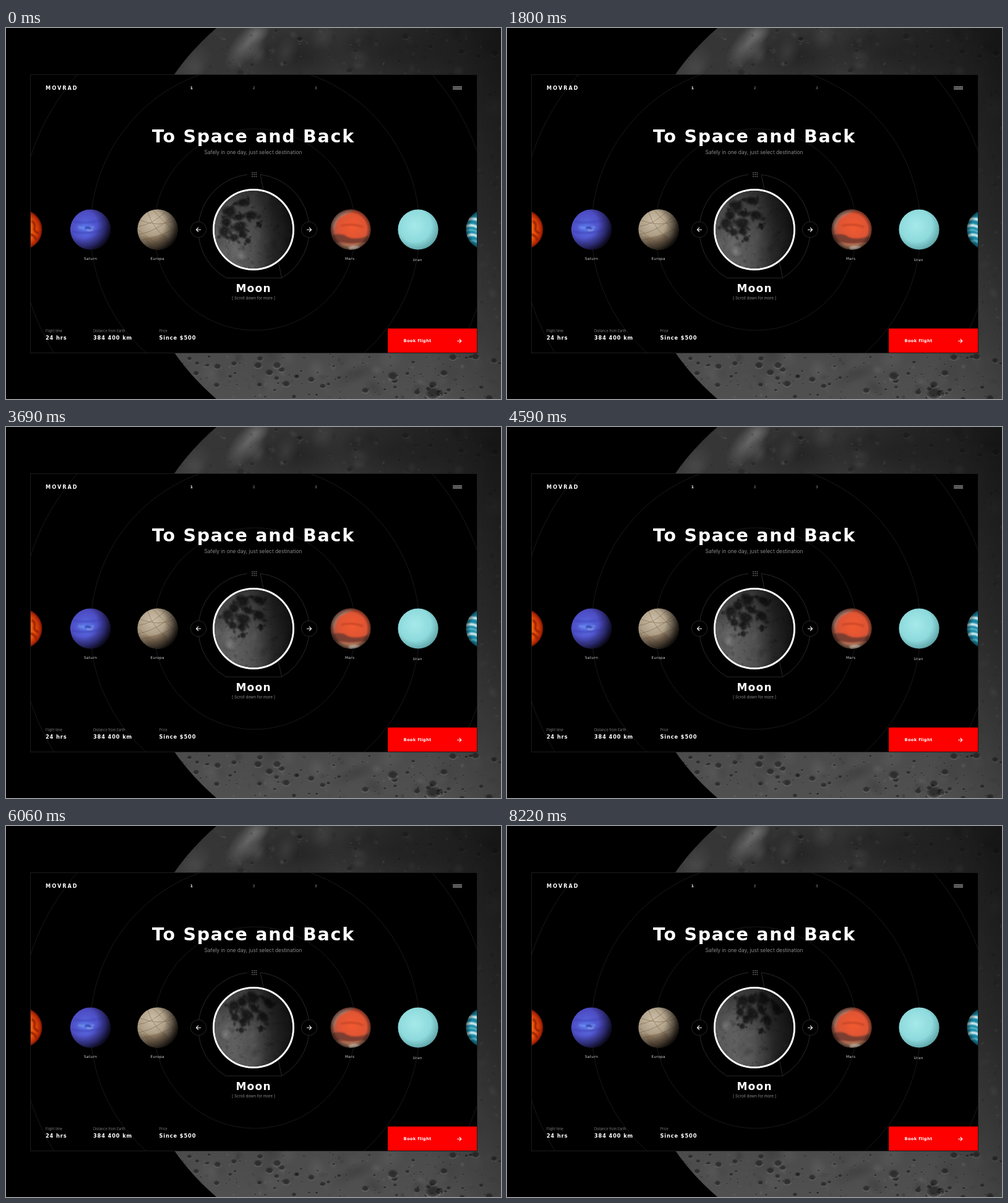
An HTML page with a canvas for the animation above (8250 ms loop, 800 by 600 pixels).

```html
<!DOCTYPE html>
<html lang="en">
<head>
<meta charset="utf-8">
<title>To Space and Back</title>
<style>
  html, body { margin: 0; width: 100%; height: 100%; overflow: hidden; background: #000; }
  #stage { position: absolute; left: 0; top: 0; width: 800px; height: 600px; overflow: hidden; }
  #sky, #ui { position: absolute; left: 0; top: 0; width: 800px; height: 600px; display: block; }
  #moon { position: absolute; left: 334px; top: 259.5px; width: 126px; height: 126px; border: 3.5px solid #fff; border-radius: 50%; overflow: hidden; background: #111; }
  #globe { position: absolute; left: 0; top: 0; width: 126px; height: 126px; }
  #shade { position: absolute; inset: 0; border-radius: 50%;
    background:
      radial-gradient(circle at 50% 50%, rgba(0,0,0,0) 84%, rgba(0,0,0,.5) 100%),
      linear-gradient(90deg, rgba(0,0,0,.12) 0, rgba(0,0,0,.04) 25%, rgba(0,0,0,.2) 50%, rgba(0,0,0,.62) 74%, rgba(0,0,0,.84) 100%),
      linear-gradient(180deg, rgba(0,0,0,.38) 0, rgba(0,0,0,0) 55%); }
  text { fill: #fff; white-space: pre; }
  .wide { font-family: "DejaVu Sans", sans-serif; font-weight: 700; }
  .thin { font-family: Inter, sans-serif; fill: #8a8a8a; }
  .head { font-size: 28.5px; letter-spacing: 1.75px; }
  .name { font-size: 17px; letter-spacing: 1.2px; }
  .value { font-size: 8.3px; letter-spacing: .85px; }
  .label { font-family: "DejaVu Sans", sans-serif; font-size: 5.8px; letter-spacing: .35px; fill: #d0d0d0; }
  .info { font-size: 5.5px; fill: #777; }
  .nav { font-size: 6px; }
  .ring { fill: none; stroke: #191919; }
  .icon { fill: none; stroke: #fff; stroke-width: 1.1; }
</style>
</head>
<body>
<div id="stage">
  <canvas id="sky" width="800" height="600"></canvas>
  <svg id="ui" viewBox="0 0 800 600">
    <defs>
      <clipPath id="card"><rect x="40" y="76" width="721" height="449"/></clipPath>
      <clipPath id="disc"><circle r="32.7"/></clipPath>
      <radialGradient id="dusk" cx=".32" cy=".36" r=".76">
        <stop offset=".45" stop-opacity="0"/><stop offset=".72" stop-opacity=".42"/><stop offset="1" stop-opacity="1"/>
      </radialGradient>
      <radialGradient id="rim">
        <stop offset=".78" stop-opacity="0"/><stop offset="1" stop-opacity=".5"/>
      </radialGradient>
      <radialGradient id="blue" cx=".38" cy=".46" r=".62">
        <stop offset="0" stop-color="#5c7cec"/><stop offset=".4" stop-color="#5257cf"/><stop offset="1" stop-color="#443cae"/>
      </radialGradient>
      <radialGradient id="sand" cx=".38" cy=".3" r=".75">
        <stop offset="0" stop-color="#cdbfa8"/><stop offset=".55" stop-color="#a89880"/><stop offset="1" stop-color="#6d5c48"/>
      </radialGradient>
      <radialGradient id="rust" cx=".55" cy=".42" r=".6">
        <stop offset="0" stop-color="#f25a30"/><stop offset=".6" stop-color="#dd5434"/><stop offset=".85" stop-color="#a65a48"/><stop offset="1" stop-color="#5a4540"/>
      </radialGradient>
      <radialGradient id="aqua" cx=".42" cy=".4" r=".62">
        <stop offset="0" stop-color="#a5e9ea"/><stop offset=".65" stop-color="#8edadc"/><stop offset="1" stop-color="#5fa5a9"/>
      </radialGradient>
      <radialGradient id="fire" cx=".5" cy=".5" r=".5">
        <stop offset="0" stop-color="#f77a10"/><stop offset=".65" stop-color="#ee5008"/><stop offset=".9" stop-color="#b02604"/><stop offset="1" stop-color="#5a1002"/>
      </radialGradient>
      <filter id="soft" x="-40%" y="-40%" width="180%" height="180%"><feGaussianBlur stdDeviation="1"/></filter>
    </defs>

    <rect x="39.5" y="75.5" width="722" height="450" stroke="#1c1c1c"/>
    <g clip-path="url(#card)">
      <circle class="ring" cx="402" cy="326" r="163"/>
      <circle class="ring" cx="402.5" cy="326" r="266"/>
      <circle class="ring" cx="402" cy="326" r="381"/>

      <g transform="translate(26 326)"><g clip-path="url(#disc)">
        <circle r="32.7" fill="url(#fire)"/>
        <path d="M16-14q6 5 4 11t7 9M13 8q7 0 10 9" fill="none" stroke="#8c1c02" stroke-width="3" filter="url(#soft)"/>
      </g></g>

      <g transform="translate(136.5 326)"><g clip-path="url(#disc)">
        <circle r="32.7" fill="url(#blue)"/>
        <g filter="url(#soft)" fill="none">
          <path d="M-31 3Q0 10 31-4M-28-13Q0-8 26-18" stroke="#4144b8" stroke-width="4" opacity=".6"/>
          <path d="M-20-4Q-8-1 6-4" stroke="#79a4f6" stroke-width="3" opacity=".6"/>
          <path d="M-9-2Q-4-5 1-1" stroke="#2b3aa5" stroke-width="3"/>
          <path d="M-6 1Q0 2 4 0" stroke="#b5cdff" stroke-width="1"/>
        </g>
        <circle r="33" fill="url(#dusk)"/>
      </g></g>

      <g transform="translate(245 326)"><g clip-path="url(#disc)">
        <circle r="32.9" fill="url(#sand)"/>
        <g fill="none" stroke="#755b3f" stroke-width=".8" opacity=".65">
          <path d="M-32-5Q-8-8 14-30M-28-15Q2-3 28-15M-30 8Q0 2 25-22M-16-28Q-6 2 20 18M-26 17Q0 13 31-3M-8-32Q8-15 29 5M-32 0Q-12 16 6 28"/>
        </g>
        <path d="M-25 10Q-10 15 12 7L18 22-12 29Z" fill="#725a41" opacity=".45" filter="url(#soft)"/>
        <circle r="33" fill="url(#dusk)"/>
      </g></g>

      <g transform="translate(557 326)"><g clip-path="url(#disc)">
        <circle r="32.7" fill="url(#rust)"/>
        <g filter="url(#soft)">
          <path d="M-31-8Q-27-26-8-31L8-32Q-8-25-19-18-25-10-27 2Z" fill="#a58a7c" opacity=".75"/>
          <path d="M-30 9Q-14 5-5 12 8 18 29 10L26 20Q8 23-5 22-18 19-28 21Z" fill="#6d3a2e" opacity=".85"/>
          <path d="M-24 22Q-6 25 24 21L12 31-10 32Z" fill="#a77a5c" opacity=".75"/>
          <path d="M-4 29Q6 25 16 28L8 33H-2Z" fill="#e8d2bd"/>
          <path d="M-16-6Q2-11 20-4" fill="none" stroke="#c94728" stroke-width="3"/>
        </g>
        <circle r="32.7" fill="url(#rim)"/>
      </g></g>

      <circle cx="666" cy="326" r="32.6" fill="url(#aqua)"/>

      <g transform="translate(776 326)"><g clip-path="url(#disc)">
        <circle r="32.7" fill="#1688a5"/>
        <g fill="none" stroke="#d8f2f4" filter="url(#soft)">
          <path d="M-30-16Q-22-20-12-15M-33-5Q-24-10-12-3M-31 11Q-24 5-12 12" stroke-width="4"/>
          <path d="M-32 2Q-24-2-12 5M-28 20Q-20 15-10 22" stroke="#69c3d2" stroke-width="2.5"/>
        </g>
        <circle r="32.7" fill="url(#rim)"/>
      </g></g>
    </g>

    <path d="M355.5 404.2A90 90 0 0 1 390 237M411 237A90 90 0 0 1 445.5 404.2Z" fill="none" stroke="#292929"/>
    <path d="M355.5 404.2H445.5" stroke="#292929"/>
    <g id="dots" fill="#aaa"></g>
    <g fill="#000" stroke="#252525"><circle cx="311" cy="326" r="12.7"/><circle cx="490" cy="326" r="12.7"/></g>
    <g class="icon">
      <path d="M315 326.2H307.5M311 322.7L307.5 326.2 311 329.7"/>
      <path d="M486 326.2H493.5M490 322.7L493.5 326.2 490 329.7"/>
      <path d="M722 95.5H737M722 98.5H737" stroke-width="1"/>
    </g>

    <text class="wide" x="64" y="100" font-size="8.2" letter-spacing="2">MOVRAD</text>
    <text class="wide nav" x="297.7" y="99">1</text>
    <text class="wide nav" x="398.5" y="99" style="fill:#5c5c5c">2</text>
    <text class="wide nav" x="498.7" y="99" style="fill:#5c5c5c">3</text>
    <text class="wide head" x="236" y="184.5">To Space and Back</text>
    <text class="thin" x="320.5" y="203.7" font-size="8.35">Safely in one day, just select destination</text>

    <text class="label" x="126" y="375">Saturn</text>
    <text class="label" x="233.5" y="375">Europa</text>
    <text class="label" x="548" y="375">Mars</text>
    <text class="label" x="657.5" y="377">Uran</text>

    <text class="wide name" x="371.5" y="427">Moon</text>
    <text class="thin" x="365" y="439" font-size="6.3">[ Scroll down for more ]</text>

    <text class="thin info" x="64" y="492">Flight time</text>
    <text class="thin info" x="141" y="492">Distance from Earth</text>
    <text class="thin info" x="247.5" y="492">Price</text>
    <text class="wide value" x="64" y="503.7">24 hrs</text>
    <text class="wide value" x="141" y="503.7">384 400 km</text>
    <text class="wide value" x="247.5" y="503.7">Since $500</text>

    <rect x="617" y="486" width="144" height="39" fill="#f00"/>
    <text class="wide" x="642.5" y="508.2" font-size="6.6" letter-spacing=".4">Book flight</text>
    <path class="icon" d="M729 506.2H735.7M732.6 503L735.8 506.2 732.6 509.4"/>
  </svg>
  <div id="moon"><canvas id="globe" width="252" height="252"></canvas><div id="shade"></div></div>
</div>
<script>
  const LOOP = 8250, TURN = 70;

  function seeded(s) {
    return () => (s = (s * 16807) % 2147483647) / 2147483647;
  }

  function blob(c, x, y, rx, ry, tone, alpha, angle = 0, core = 0) {
    c.save();
    c.translate(x, y);
    c.rotate(angle);
    c.scale(rx, ry);
    const g = c.createRadialGradient(0, 0, core, 0, 0, 1);
    g.addColorStop(0, `rgba(${tone},${tone},${tone},${alpha})`);
    g.addColorStop(1, `rgba(${tone},${tone},${tone},0)`);
    c.fillStyle = g;
    c.fillRect(-1, -1, 2, 2);
    c.restore();
  }

  // Random soft patches, alternately darker and lighter
  function mottle(c, rnd, n, w, h, min, max, alpha) {
    for (let i = 0; i < n; i++) {
      const r = min + (max - min) * rnd() ** 2;
      blob(c, rnd() * w, rnd() * h, r, r * (.5 + rnd() * .5), i % 2 ? 150 : 8, alpha * rnd(), rnd() * 3);
    }
  }

  function crater(c, x, y, r, alpha) {
    blob(c, x, y, r, r * .8, 15, alpha, 0, .5);
    c.strokeStyle = `rgba(150,150,150,${alpha * .7})`;
    c.lineWidth = Math.max(.6, r * .16);
    c.beginPath();
    c.ellipse(x, y, r, r * .8, 0, .2, 2.6);
    c.stroke();
  }

  function drawSky() {
    const c = document.getElementById('sky').getContext('2d'), rnd = seeded(71);
    c.beginPath();
    c.arc(595.5, 300, 394, 0, 7);
    c.clip();
    const g = c.createLinearGradient(0, 0, 0, 600);
    g.addColorStop(0, '#353535');
    g.addColorStop(.5, '#3c3c3c');
    g.addColorStop(1, '#505050');
    c.fillStyle = g;
    c.fillRect(0, 0, 800, 600);
    blob(c, 470, 45, 90, 50, 22, .55);
    blob(c, 620, 40, 110, 45, 28, .4);
    blob(c, 390, 25, 52, 22, 125, .65, -.9);
    blob(c, 403, 10, 24, 16, 135, .45, -.4);
    blob(c, 300, 60, 40, 25, 85, .5, -.8);
    mottle(c, rnd, 700, 800, 600, 3, 30, .17);
    mottle(c, rnd, 1600, 800, 600, 1, 5, .28);
    for (let i = 0; i < 190; i++) {
      const low = i % 4;
      crater(c, 260 + rnd() * 540, low ? 520 + rnd() * 80 : rnd() * 80, 1.5 + 6 * rnd() ** 3, low ? .5 : .28);
    }
    crater(c, 690, 590, 13, .5);
    crater(c, 625, 562, 9, .5);
    const night = c.createLinearGradient(540, 100, 810, 10);
    night.addColorStop(0, 'rgba(0,0,0,0)');
    night.addColorStop(1, 'rgba(0,0,0,.62)');
    c.fillStyle = night;
    c.fillRect(0, 0, 800, 600);
  }

  // Dark plains around the disc centre: x, y, rx, ry
  const PLAINS = [
    [-4, -23, 13, 9], [-38, -29, 13, 11], [-44, -12, 11, 10], [-48, 3, 10, 12], [-23, -4, 15, 11],
    [-17, 8, 9, 8], [-9, 18, 6, 6], [-32, 13, 11, 8], [-24, -20, 11, 7], [-17, -44, 13, 8], [9, -8, 6, 6]
  ];

  function drawGlobe() {
    const c = document.getElementById('globe').getContext('2d'), rnd = seeded(19);
    c.scale(2, 2);
    c.fillStyle = '#646464';
    c.fillRect(0, 0, 126, 126);
    mottle(c, rnd, 160, 126, 126, 4, 16, .22);
    for (const [x, y, rx, ry] of PLAINS) {
      blob(c, 63 + x, 63 + y, rx, ry, 26, .85, rnd() - .5, .45);
      for (let i = 0; i < 4; i++) {
        blob(c, 63 + x + (rnd() - .5) * rx * 2, 63 + y + (rnd() - .5) * ry * 2, rx * .45, ry * .4, 28, .6, rnd() * 3, .3);
      }
    }
    mottle(c, rnd, 900, 126, 126, .6, 2.6, .34);
    for (let i = 0; i < 45; i++) crater(c, rnd() * 126, rnd() * 126, .6 + 1.8 * rnd() ** 2, .35);
    blob(c, 44, 105, 10, 10, 170, .5);
    blob(c, 25, 82, 6, 6, 165, .4);
  }

  document.getElementById('dots').innerHTML = Array.from({ length: 9 }, (_, i) =>
    `<circle cx="${398 + i % 3 * 3.1}" cy="${234 + Math.floor(i / 3) * 3.1}" r=".75"/>`).join('');
  drawSky();
  drawGlobe();
  document.getElementById('globe').animate(
    [{ transform: 'rotate(0deg)' }, { transform: `rotate(${TURN}deg)` }],
    { duration: LOOP, iterations: Infinity, easing: 'linear' }
  );
</script>
</body>
</html>
```
